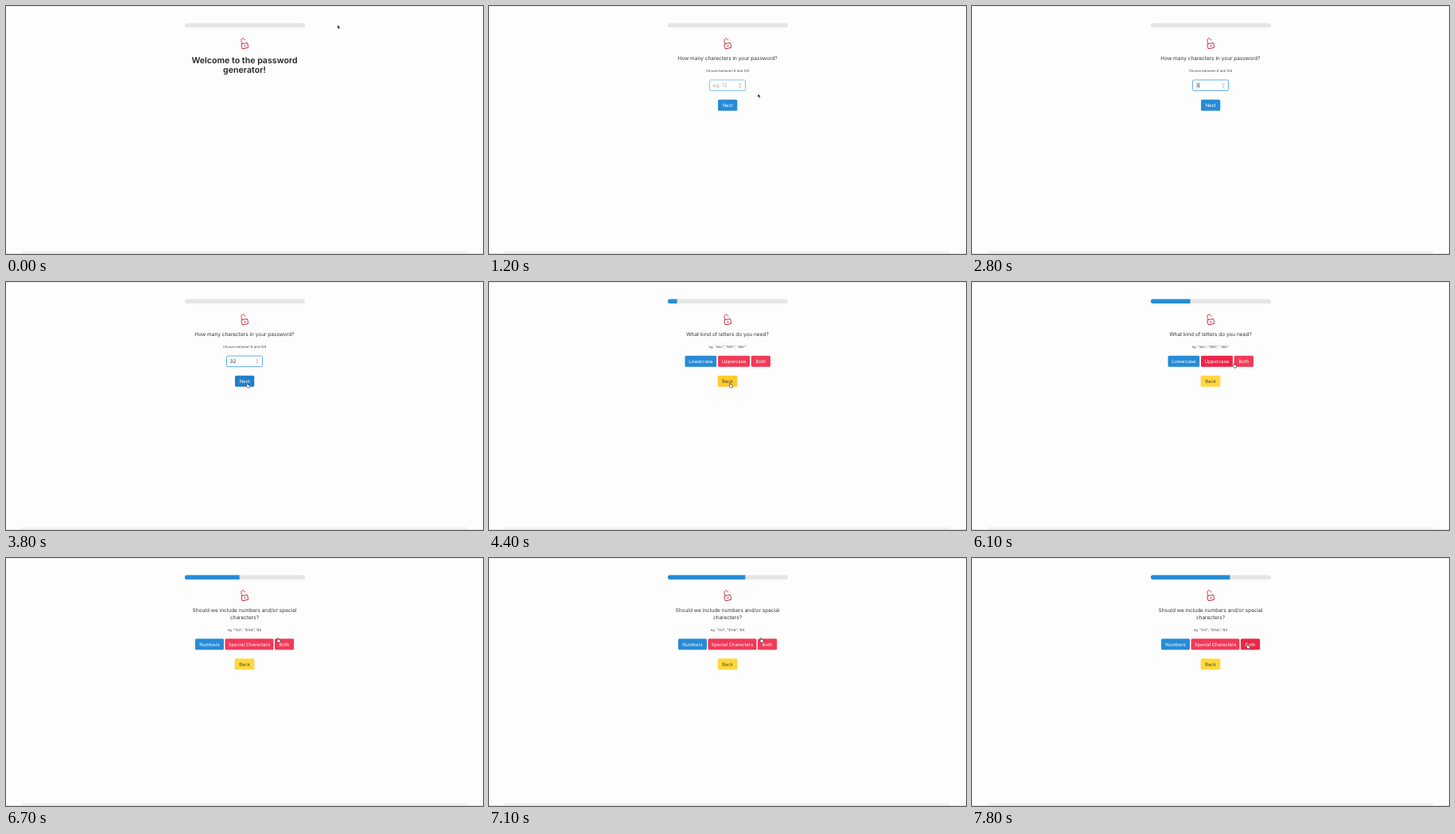
These frames come from a looping animation (600 by 312 pixels, 8 s). An HTML page:

```html
<!DOCTYPE html>
<html lang="en">
<head>
<meta charset="utf-8">
<title>Password generator</title>
<style>
  html, body { margin: 0; width: 100%; height: 100%; overflow: hidden; background: #fdfdfd; }
  svg { display: block; width: 100vw; height: 100vh; }
  text { font-family: Inter, Roboto, sans-serif; font-size: 6.53px; fill: #363636; text-anchor: middle; text-rendering: geometricPrecision; }
  .title { font-size: 10.65px; font-weight: 600; fill: #222; }
  .hint { font-size: 4.25px; fill: #4a4a4a; }
  .left { text-anchor: start; }
  .blue { --base: #278bd6; --hover: #207fc9; --ink: #fff; }
  .red { --base: #f03a58; --hover: #ee2649; --ink: #fff; }
  .yellow { --base: #ffd83d; --hover: #ffcb2b; --ink: #4a4326; }
  .button rect { fill: var(--base); }
  .button.hover rect { fill: var(--hover); }
  .button text { fill: var(--ink); font-size: 5.9px; }
</style>
</head>
<body>
<svg viewBox="0 0 600 312">
  <defs>
    <linearGradient id="shade" x2="0" y2="1">
      <stop offset="0" stop-color="#fdfdfd"/><stop offset="1" stop-color="#ececec"/>
    </linearGradient>
    <clipPath id="track"><rect x="224.9" y="21.5" width="151.1" height="5.6" rx="2.8"/></clipPath>
  </defs>
  <rect width="600" height="312" fill="#fdfdfd"/>
  <rect width="600" height="1" fill="#ebebeb"/>
  <rect x="20" y="307" width="560" height="4" fill="url(#shade)"/>
  <rect y="311" width="600" height="1" fill="#dedede"/>

  <g clip-path="url(#track)">
    <rect x="224" y="21" width="153" height="7" fill="#e5e5e5"/>
    <rect id="bar" x="224" y="21" height="7" fill="#278bd6"/>
  </g>

  <g fill="none" stroke="#cf2f42" stroke-width=".95" stroke-linecap="round" stroke-linejoin="round">
    <rect x="296.4" y="47" width="7.9" height="6.2" rx="1" transform="rotate(-12 300.3 50.2)"/>
    <path d="M297.2 47.6L296.1 44.5C295.1 40.6 299.5 39.2 300.7 42.8"/>
    <circle cx="300.4" cy="50.2" r=".45" fill="#cf2f42"/>
  </g>

  <g id="welcome">
    <text class="title" x="300" y="71.5">Welcome to the password</text>
    <text class="title" x="300" y="84.4">generator!</text>
    <text id="begin" x="300" y="106" style="font-size:10.3px">Let's begin!</text>
  </g>
  <g id="length">
    <text x="300" y="68.2">How many charecters in your password?</text>
    <text class="hint" x="300" y="83">Choose between 8 and 128</text>
    <rect id="field" x="277.5" y="93" width="45" height="13.6" rx="1.8" fill="#fff"/>
    <text id="value" class="left" x="281.6" y="102.1"></text>
    <path id="caret" d="M285.9 96.6v6.6" stroke="#333" stroke-width=".6"/>
    <path d="M314.8 98.8l1.2-1.3 1.2 1.3M314.8 101.1l1.2 1.3 1.2-1.3" fill="none" stroke="#8a7268" stroke-width=".7"/>
  </g>
  <g id="letters">
    <text x="300" y="68.2">What kind of letters do you need?</text>
    <text class="hint" x="300" y="83">eg. "abc", "ABC", "aBc"</text>
  </g>
  <g id="symbols">
    <text x="300" y="68.2">Should we include numbers and/or special</text>
    <text x="300" y="77.2">charecters?</text>
    <text class="hint" x="300" y="92">eg. "123", "$%&amp;", !$3</text>
  </g>

  <path id="arrow" d="M0 0v4.8l1.1-1 .8 1.8.9-.4-.8-1.7h1.5z" fill="#111" stroke="#fff" stroke-width=".35"/>
  <path id="beam" d="M-1 -3h2M0-3v6M-1 3h2" fill="none" stroke="#444" stroke-width=".6"/>
  <path id="hand" d="M1.2 .5q.6-.8 1.1 0l.2 1.7 1.8.5q.8.3.7 1.2l-.5 2.2h-2.5l-1.6-2.2q-.1-.8.8-.5z" fill="#fff" stroke="#222" stroke-width=".6" stroke-linejoin="round"/>
</svg>
<script>
const LOOP = 8000;
const $ = id => document.getElementById(id);
const show = (id, on) => $(id).style.display = on ? '' : 'none';
const buttons = [];

function addButton(screen, label, color, x, y, w) {
  const h = 14;
  const box = document.createElementNS('http://www.w3.org/2000/svg', 'g');
  box.setAttribute('class', `button ${color}`);
  box.innerHTML = `<rect x="${x}" y="${y}" width="${w}" height="${h}" rx="1.5"/>
    <text x="${x + w / 2}" y="${y + 9.3}">${label}</text>`;
  $(screen).append(box);
  buttons.push({ box, screen, x, y, w, h });
}

addButton('length', 'Next', 'blue', 288, 117.7, 24.3);
addButton('letters', 'Lowercase', 'blue', 246.5, 92.8, 39.7);
addButton('letters', 'Uppercase', 'red', 288, 92.8, 40);
addButton('letters', 'Both', 'red', 329.8, 92.8, 24.2);
addButton('letters', 'Back', 'yellow', 287.7, 117.7, 24.7);
addButton('symbols', 'Numbers', 'blue', 238, 101.5, 36);
addButton('symbols', 'Special Charecters', 'red', 275.5, 101.5, 61);
addButton('symbols', 'Both', 'red', 338, 101.5, 24.2);
addButton('symbols', 'Back', 'yellow', 287.7, 126.5, 24.7);

// [time, x, y] of the pointer
const route = [
  [0, 417, 23.8], [600, 417, 23.8], [1200, 338.3, 110.4], [1400, 328, 111], [1600, 298.5, 103],
  [2800, 302.5, 136], [3100, 302.5, 135], [3600, 301.7, 127], [5450, 301.7, 127],
  [5750, 280, 103], [6100, 327.9, 102], [6300, 320.5, 101], [6400, 340.2, 100.4],
  [7400, 340.2, 100.4], [7800, 344.6, 108], [LOOP, 344.6, 108]
];

function pointerAt(t) {
  const i = Math.max(1, route.findIndex(p => p[0] > t));
  const [t0, x0, y0] = route[i - 1], [t1, x1, y1] = route[i];
  const k = (t - t0) / (t1 - t0);
  return [x0 + (x1 - x0) * k, y0 + (y1 - y0) * k];
}

// cubic-bezier(.25, .1, .25, 1), solved by bisection
function ease(p) {
  p = Math.min(1, Math.max(0, p));
  const curve = (a, b, s) => 3 * a * s * (1 - s) ** 2 + 3 * b * s * s * (1 - s) + s ** 3;
  let low = 0, high = 1;
  for (let i = 0; i < 20; i++) {
    const mid = (low + high) / 2;
    if (curve(.25, .25, mid) < p) low = mid; else high = mid;
  }
  return curve(.1, 1, low);
}

function draw(t) {
  const screen = t < 1000 ? 'welcome' : t < 4250 ? 'length' : t < 6510 ? 'letters' : 'symbols';
  for (const id of ['welcome', 'length', 'letters', 'symbols']) show(id, id === screen);
  show('begin', t >= 200);
  $('bar').setAttribute('width', .5 + 50 * (ease((t - 4260) / 800) + ease((t - 6510) / 800)));

  const clicked = t >= 2000;
  $('field').setAttribute('stroke', clicked ? '#5fb0e6' : '#74bbeb');
  $('field').setAttribute('stroke-width', clicked ? 1 : .9);
  $('value').textContent = t < 2400 ? 'eg. 12' : t < 2900 ? '3' : '32';
  $('value').style.fill = t < 2400 ? '#aaa' : '#363636';
  show('caret', t >= 2500 && t < 2900);

  const [x, y] = pointerAt(t);
  const shape = t < 1550 ? 'arrow' : t < 2400 ? 'beam' : t < 2900 ? '' : t < 3100 ? 'arrow' : 'hand';
  for (const id of ['arrow', 'beam', 'hand']) show(id, id === shape);
  if (shape) $(shape).setAttribute('transform', `translate(${x} ${y})`);
  for (const b of buttons) {
    const over = shape && b.screen === screen && x >= b.x && x <= b.x + b.w && y >= b.y && y <= b.y + b.h;
    b.box.classList.toggle('hover', !!over);
  }
}

const start = performance.now();
function tick() {
  draw((performance.now() - start) % LOOP);
  requestAnimationFrame(tick);
}
tick();
</script>
</body>
</html>
```
